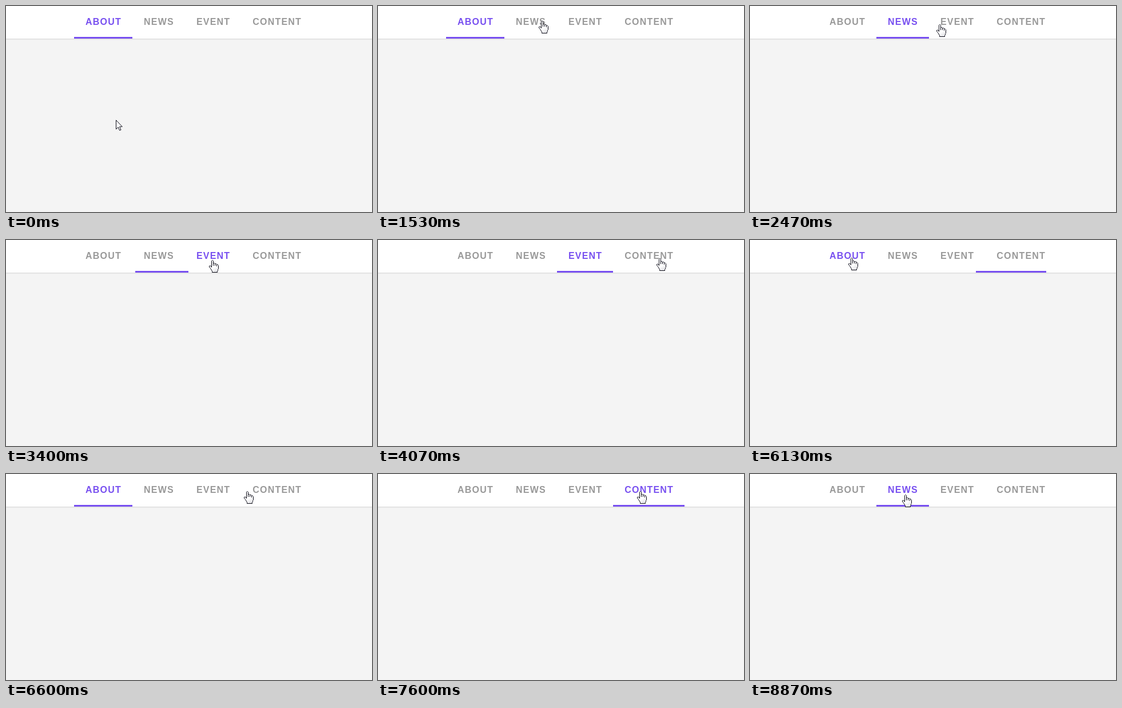
These frames come from a looping animation (640 px wide and 360 px high, 8940 ms). An HTML page with a canvas:

```html
<!DOCTYPE html>
<html lang="en">
<head>
<meta charset="utf-8">
<title>Tab menu</title>
<style>
  html, body { margin: 0; width: 100%; height: 100%; overflow: hidden; background: #f4f4f4; }
  nav {
    position: absolute; left: 0; top: 0; width: 100%; height: 57px;
    background: #fff; box-shadow: 0 1px 2px rgba(0, 0, 0, .15);
    font: bold 16px/19px "Liberation Sans", Arial, sans-serif;
    letter-spacing: 1.2px; color: #999;
  }
  nav span { position: absolute; top: 18px; white-space: nowrap; }
  nav .on { color: #7850f0; }
  canvas { position: absolute; left: 0; top: 0; }
</style>
</head>
<body>
<nav></nav>
<canvas width="640" height="360"></canvas>
<script>
const LOOP = 8940, STEP = 200 / 3, LAST = 133;
const PURPLE = '#7850f0', INK = '#0c0c18';

const ctx = document.querySelector('canvas').getContext('2d');
const nav = document.querySelector('nav');

let edge = 119.1;
const tabs = [['ABOUT', 101.9], ['NEWS', 92], ['EVENT', 98.3], ['CONTENT', 124.4]].map(([text, width]) => {
  const label = document.createElement('span');
  label.textContent = text;
  label.style.left = edge + 20 + 'px';
  nav.append(label);
  const left = edge;
  edge += width;
  return { label, left, right: edge };
});

// Step and tab of each click
const clicks = [[0, 0], [33, 1], [51, 2], [67, 3], [92, 0], [111, 3], [130, 1]];

// Pointer moves: first and last step, where it goes, how far the path sags
const home = [192, 199];
const moves = [
  { from: 2, to: 10, x: 175, y: 37 },
  { from: 19, to: 23, x: 287, y: 26 },
  { from: 26, to: 30, x: 278, y: 26 },
  { from: 35, to: 43, x: 361, y: 35 },
  { from: 53, to: 61, x: 493, y: 32, sag: 2 },
  { from: 77, to: 89, x: 178, y: 31, sag: 14 },
  { from: 94.5, to: 105, x: 459, y: 30 },
  { from: 117, to: 125, x: 272, y: 36, sag: 12 }
];

const arrow = new Path2D('M.5 .5V16.2L4.2 12.8L6.6 18.4L9 17.5L6.6 11.9H11.3Z');
const hand = new Path2D(
  'M4.5 12.5V1.5L5.5 .5H6.5L7.5 1.5V5.5H9.5L10.5 6.5H12.5L13.5 7.5H14.5L16.5 9.5V15.5' +
  'L15.5 16.5V18.5L14.5 19.5V21.5H5.5V19.5L2.5 14.5L.5 12V10.5L1.5 10H2.5Z');
const creases = new Path2D('M7.5 5.5V10M10.5 6.5V10M13.5 7.5V11');

const shade = ctx.createLinearGradient(4, 4, 15, 21);
shade.addColorStop(.5, '#fff');
shade.addColorStop(1, '#dcdce0');

const mix = (a, b, p) => a + (b - a) * p;
const clamp = p => Math.min(1, Math.max(0, p));
const glide = p => 1 - (1 - p) ** 3.6;
const bez = (a, b, s) => 3 * a * s * (1 - s) ** 2 + 3 * b * s * s * (1 - s) + s ** 3;

// Same curve as the CSS keyword "ease"
function ease(p) {
  if (p >= 1) return 1;
  let lo = 0, hi = 1;
  for (let i = 0; i < 24; i++) {
    const mid = (lo + hi) / 2;
    if (bez(.25, .25, mid) < p) lo = mid; else hi = mid;
  }
  return bez(.1, 1, lo);
}

// The picture advances 15 times a second, on times rounded to 10 ms
function stepAt(t) {
  let k = Math.floor((t + 5) / STEP);
  if (Math.round(k * STEP / 10) * 10 > t) k--;
  return Math.min(k, LAST);
}

function pointerAt(k) {
  let [x, y] = home;
  for (const { from, to, x: endX, y: endY, sag = 0 } of moves) {
    const u = clamp((k - from) / (to - from)), p = glide(u);
    x = mix(x, endX, p);
    y = mix(y, endY, p) + sag * Math.sin(Math.PI * Math.sqrt(u));
  }
  return [Math.round(x), Math.round(y)];
}

function drawBar(k) {
  const i = clicks.findLastIndex(c => c[0] <= k);
  const [start, tab] = clicks[i];
  const from = tabs[clicks[Math.max(0, i - 1)][1]], to = tabs[tab];
  const p = ease(((k - start) * STEP + 14.5) / 200);
  const left = Math.round(mix(from.left, to.left, p));
  const right = Math.round(mix(from.right, to.right, p));
  ctx.fillStyle = PURPLE;
  ctx.fillRect(left, 54, right - left, 3);
  tabs.forEach(({ label }, n) => label.classList.toggle('on', n === tab));
}

function drawPointer(k) {
  const [x, y] = pointerAt(k);
  const onLink = y < 57;
  const shape = onLink ? hand : arrow;
  ctx.save();
  ctx.translate(onLink ? x - 6 : x, y);
  ctx.fillStyle = onLink ? shade : '#fff';
  ctx.strokeStyle = INK;
  ctx.fill(shape);
  ctx.stroke(shape);
  if (onLink) ctx.stroke(creases);
  ctx.restore();
}

let begin;
function draw(now) {
  begin ??= now;
  const k = stepAt((now - begin) % LOOP);
  ctx.clearRect(0, 0, 640, 360);
  drawBar(k);
  drawPointer(k);
  requestAnimationFrame(draw);
}
requestAnimationFrame(draw);
</script>
</body>
</html>
```
